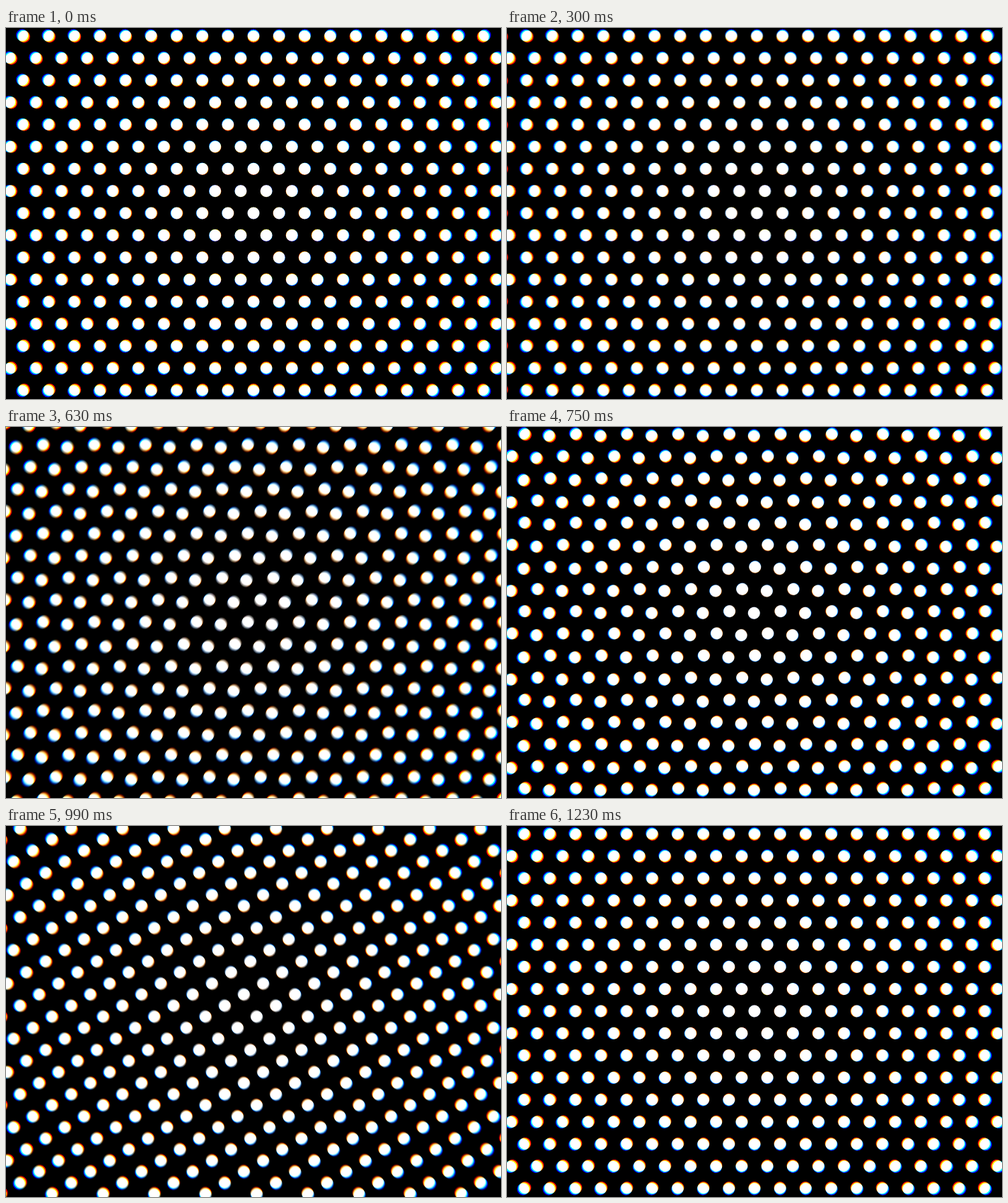
Write an HTML page with a canvas that moves like this. It is 700 by 525 pixels and loops after 1260 ms.

```html
<!DOCTYPE html>
<html>
<head>
<meta charset="utf-8">
<style>
html, body { margin: 0; background: #000; overflow: hidden; }
canvas { display: block; }
</style>
</head>
<body>
<canvas id="stage" width="700" height="525"></canvas>
<script>
const ctx = document.getElementById('stage').getContext('2d');
const STEP = 30, FRAMES = 42, PHASE = 14;
const GAP = 36.2, ROW = GAP * Math.sqrt(3) / 2, RADIUS = 8.5;
const SAMPLES = 15, SHUTTER = 0.7;
// Channel colours add up to white over all samples; each has its own magnification.
const CHANNELS = [['rgb(17,0,0)', 0.9955], ['rgb(0,17,0)', 1], ['rgb(0,0,17)', 1.0045]];

const ease = p => p < 0.5 ? (2 * p) ** 2.6 / 2 : 1 - (2 - 2 * p) ** 2.6 / 2;

// Hexagonal lattice whose alternate rows slide one gap in opposite directions.
function lattice(slide) {
  const path = new Path2D();
  for (let j = -15; j <= 15; j++) {
    const odd = j & 1;
    const shift = odd ? GAP / 2 + slide : -slide;
    for (let i = -15; i <= 15; i++) {
      const x = i * GAP + shift, y = j * ROW;
      if (Math.hypot(x, y) > 460) continue;
      path.moveTo(x + RADIUS, y);
      path.arc(x, y, RADIUS, 0, 2 * Math.PI);
    }
  }
  return path;
}

function draw(frame) {
  ctx.globalCompositeOperation = 'source-over';
  ctx.fillStyle = '#000';
  ctx.fillRect(0, 0, 700, 525);
  ctx.globalCompositeOperation = 'lighter';
  const turn = Math.floor(frame / PHASE) * 2 * Math.PI / 3;
  for (let s = 0; s < SAMPLES; s++) {
    const p = (frame % PHASE + SHUTTER * s / SAMPLES) / PHASE;
    const dots = lattice(GAP * ease(p));
    for (const [color, zoom] of CHANNELS) {
      ctx.save();
      ctx.translate(350, 262);
      ctx.rotate(turn);
      ctx.scale(zoom, zoom);
      ctx.fillStyle = color;
      ctx.fill(dots);
      ctx.restore();
    }
  }
}

let shown = -1;
function tick() {
  const frame = Math.floor(performance.now() / STEP) % FRAMES;
  if (frame !== shown) draw(shown = frame);
  requestAnimationFrame(tick);
}
tick();
</script>
</body>
</html>
```
